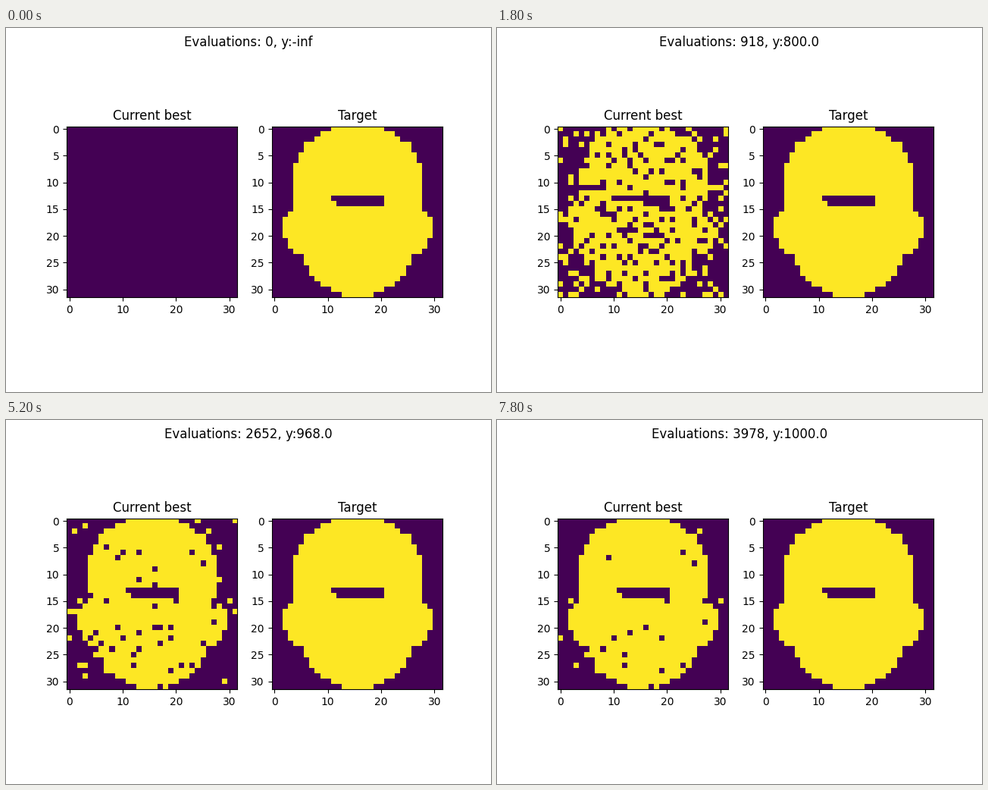
Write a matplotlib script that moves like this. It is 640x480 px and loops after 8000 ms.

```python
import matplotlib.pyplot as plt
import numpy as np
from matplotlib.animation import FuncAnimation

SIZE = 32
FRAMES = 40
EVALS_PER_FRAME = 102

# (step, wrong cells): the error decays almost exponentially between these
DECAY = [(1, 475), (5, 327), (9, 224), (15, 136), (21, 79), (31, 39), (39, 24)]

rows = np.arange(SIZE)


def oval(centre, half_width, half_height):
    """Whole half-width of an ellipse in every row, 0 outside it."""
    d = (rows - centre) / half_height
    return np.floor(half_width * np.sqrt(np.clip(1 - d ** 2, 0, None)))


def make_face():
    dome = oval(8, 12.3, 8.8)
    ears = oval(18.9, 14.6, 7.22)
    jaw = oval(23, 10.6, 8.4)
    sides = np.where((rows >= 8) & (rows < 24), 12, 0)
    half = np.max([dome, ears, jaw, sides], axis=0)[:, None]
    x = rows - SIZE // 2
    face = ((x >= -half) & (x < half)).astype(int)
    face[13, 11:21] = 0
    face[14, 12:21] = 0
    return face


face = make_face()
order = np.random.default_rng(7).permutation(face.size)  # first solved is last
steps, wrong_cells = np.array(DECAY).T


def state(step):
    """Grid and score after the given step."""
    if step == 0:
        return np.zeros_like(face), -np.inf
    wrong = round(np.exp(np.interp(step, steps, np.log(wrong_cells))))
    grid = face.copy()
    grid.flat[order[:wrong]] ^= 1
    return grid, float(face.size - wrong)


fig, (ax_best, ax_face) = plt.subplots(1, 2, figsize=(6.4, 4.8), dpi=100)
best = ax_best.imshow(np.zeros_like(face), vmin=0, vmax=1)
ax_best.set_title("Current best")
ax_face.imshow(face)
ax_face.set_title("Target")
heading = fig.suptitle("")


def update(step):
    grid, score = state(step)
    best.set_data(grid)
    heading.set_text(f"Evaluations: {step * EVALS_PER_FRAME}, y:{score}")
    return best, heading


anim = FuncAnimation(fig, update, frames=FRAMES, interval=200,
                     repeat=True, repeat_delay=0, blit=False)
plt.show()
```
